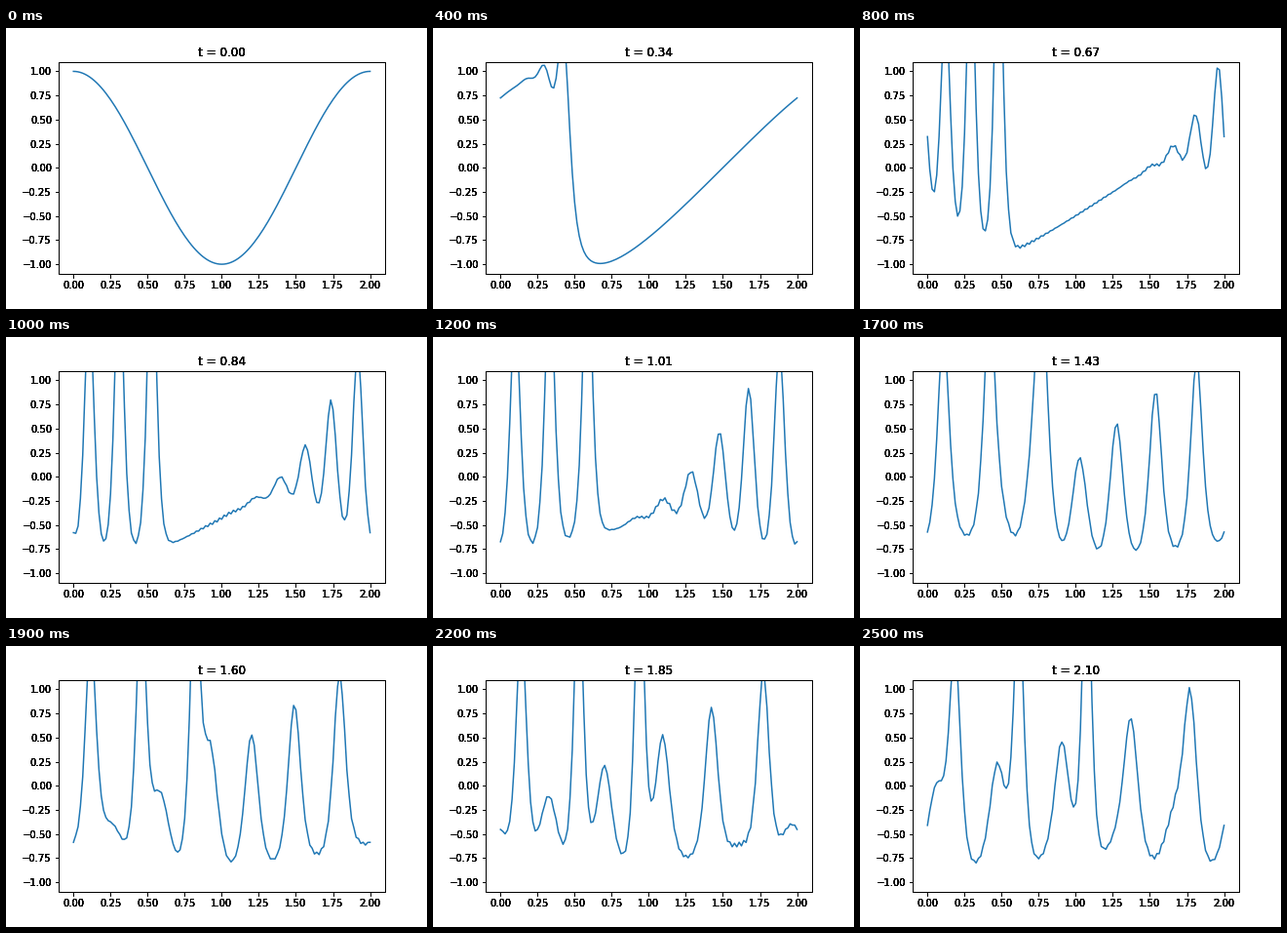
Write a matplotlib script that moves like this. It is 432 px wide and 288 px high and loops after 2.55 s.

```python
import numpy as np
import matplotlib.pyplot as plt
from matplotlib.animation import FuncAnimation

FRAMES = 51
FRAME_DT = 0.042
SUBSTEPS = 100
N = 128
DELTA = 0.022
DX = 2 / N
DT = FRAME_DT / SUBSTEPS


def slope(u):
    """Time derivative of the KdV equation on a periodic grid."""
    r1, l1 = np.roll(u, -1), np.roll(u, 1)
    r2, l2 = np.roll(u, -2), np.roll(u, 2)
    advection = (r1 + u + l1) * (r1 - l1) / (6 * DX)
    dispersion = DELTA**2 * (r2 - 2 * r1 + 2 * l1 - l2) / (2 * DX**3)
    return -advection - dispersion


def solve():
    """Leapfrog integration, keeping one profile per animation frame."""
    prev = np.cos(np.pi * DX * np.arange(N))
    cur = prev + DT * slope(prev)
    profiles = [prev]
    for step in range(1, (FRAMES - 1) * SUBSTEPS + 1):
        if step % SUBSTEPS == 0:
            profiles.append(cur)
        prev, cur = cur, prev + 2 * DT * slope(cur)
    return [np.append(u, u[0]) for u in profiles]


def darken(artist):
    """Draw an artist several times so its soft edges turn solid."""
    draw = artist.draw

    def draw_solid(renderer):
        for _ in range(6):
            draw(renderer)

    artist.draw = draw_solid


profiles = solve()
x = np.linspace(0, 2, N + 1)

fig = plt.figure(figsize=(6, 4), dpi=72, facecolor="white")
fig.subplots_adjust(left=0.125, right=0.9, bottom=0.125, top=0.88)
ax = fig.add_subplot()
line, = ax.plot(x, profiles[0], color="#1f77b4", lw=1.5)
ax.set_xlim(-0.1, 2.1)
ax.set_ylim(-1.1, 1.1)
ax.set_xticks(np.arange(0, 2.01, 0.25))
ax.set_yticks(np.arange(-1, 1.01, 0.25))
title = ax.set_title("t = 0.00", fontsize=12)

for part in [title, *ax.get_xticklabels(), *ax.get_yticklabels(),
             *ax.get_xticklines(), *ax.get_yticklines(), *ax.spines.values()]:
    darken(part)


def update(i):
    line.set_ydata(profiles[i])
    title.set_text(f"t = {i * FRAME_DT:.2f}")
    return line, title


anim = FuncAnimation(fig, update, frames=FRAMES, interval=50,
                     repeat=True, repeat_delay=0, blit=False)
plt.show()
```
